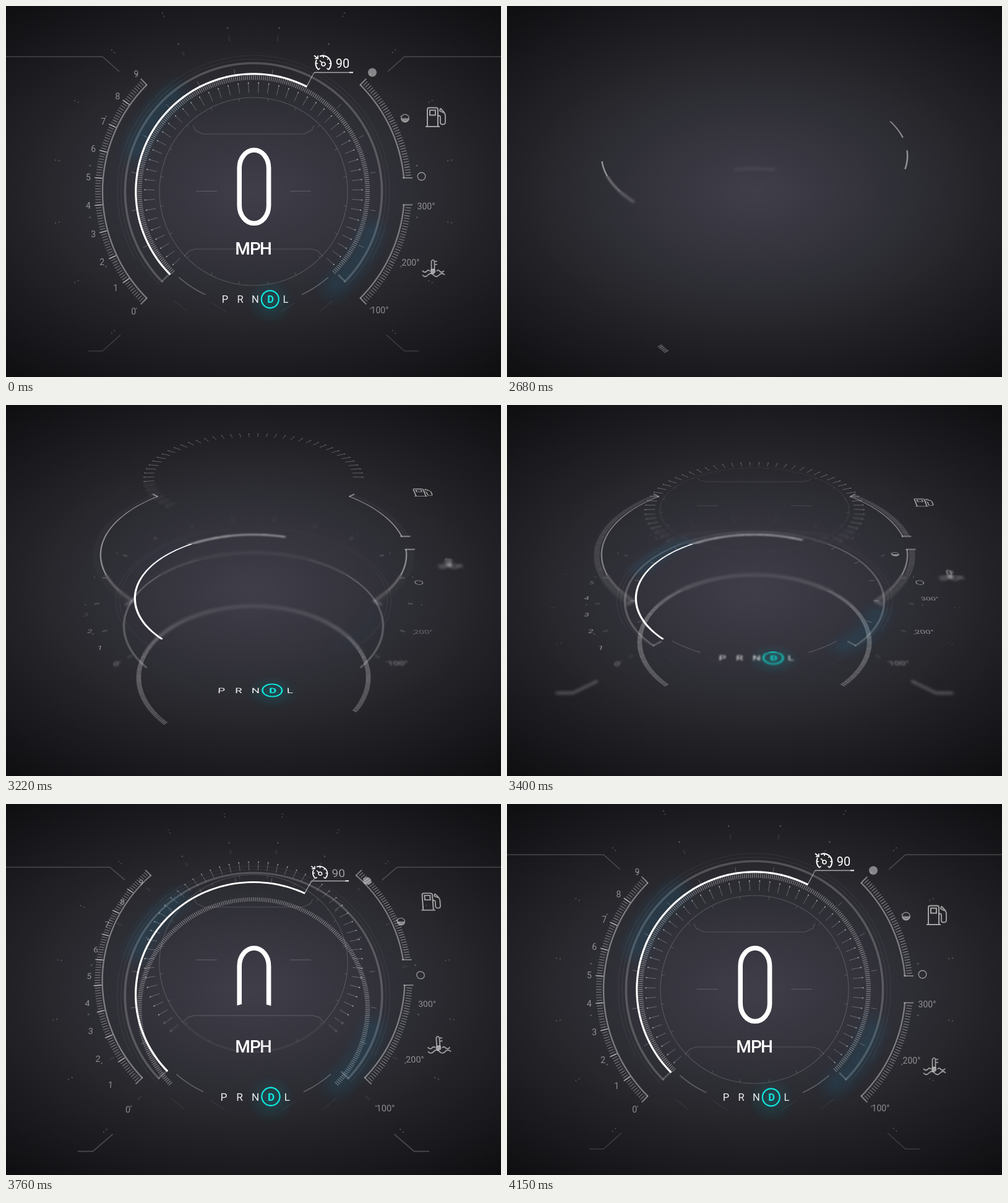
An HTML page with a canvas for the animation above (4.24 s loop, 800x600 px).

```html
<!DOCTYPE html>
<html lang="en">
<head>
<meta charset="utf-8">
<title>Dashboard</title>
<style>
  html, body { margin: 0; width: 100%; height: 100%; overflow: hidden; background: #0e0e11; }
  canvas { display: block; width: 800px; height: 600px; }
</style>
</head>
<body>
<canvas id="stage" width="800" height="600"></canvas>
<script>
const W = 800, H = 600, LOOP = 4240, DEPTH = 1290, RAD = Math.PI / 180, TILT = 57.7 * RAD;
const ctx = document.getElementById('stage').getContext('2d');
const buffer = Object.assign(document.createElement('canvas'), { width: W, height: H });
const g = buffer.getContext('2d');

// Projection state: tilt cosine and sine, perspective slope, layer offset
let t = 0, cos = 1, sin = 0, k = 0, lift = 0;

const white = a => `rgba(255,255,255,${a})`;
const span = (a, b) => Math.min(1, Math.max(0, (t - a) / (b - a)));
const smooth = (a, b) => { const p = span(a, b); return p * p * (3 - 2 * p); };
const polar = (r, a) => [400 + r * Math.cos(a * RAD), 300 + r * Math.sin(a * RAD)];
const mirror = pts => pts.map(([x, y]) => [W - x, y]);

function bezier(x, x1, x2) {
  let lo = 0, hi = 1, u = x;
  for (let i = 0; i < 24; i++) {
    u = (lo + hi) / 2;
    const v = 3 * x1 * u * (1 - u) ** 2 + 3 * x2 * u * u * (1 - u) + u ** 3;
    if (v < x) lo = u; else hi = u;
  }
  return u * u * (3 - 2 * u);
}

function project([x, y]) {
  const s = 1 / (1 - k * (y - 300));
  return [400 + (x - 400) * s, 300 + ((y - 300) * cos + lift) * s];
}

function trace(pts) {
  g.beginPath();
  pts.forEach(p => g.lineTo(...project(p)));
}

function line(pts, width, alpha) {
  trace(pts);
  g.lineWidth = width;
  g.strokeStyle = white(alpha);
  g.stroke();
}

function both(pts, width, alpha) {
  line(pts, width, alpha);
  line(mirror(pts), width, alpha);
}

// Arc with a true projected thickness
function band(r, width, from, to, alpha) {
  if (to - from < .1 || alpha <= 0) return;
  const n = Math.ceil((to - from) / 2), pts = [];
  for (let i = 0; i <= n; i++) pts.push(polar(r + width / 2, from + (to - from) * i / n));
  for (let i = n; i >= 0; i--) pts.push(polar(r - width / 2, from + (to - from) * i / n));
  trace(pts);
  g.fillStyle = white(alpha);
  g.fill();
}

function ticks(r0, r1, from, to, step, width, alpha) {
  g.beginPath();
  for (let a = from; a <= to + .01; a += step) {
    g.moveTo(...project(polar(r0, a)));
    g.lineTo(...project(polar(r1, a)));
  }
  g.lineWidth = width;
  g.strokeStyle = white(alpha);
  g.stroke();
}

// Draws around a local origin lying in the tilted plane
function place(x, y, alpha, draw) {
  if (alpha <= 0) return;
  const X = x - 400, Y = y - 300, s = 1 / (1 - k * Y);
  g.save();
  g.globalAlpha = alpha;
  g.setTransform(s, 0, X * k * s * s, cos * s + (Y * cos + lift) * k * s * s, ...project([x, y]));
  draw();
  g.restore();
}

function dot(x, y, r, alpha) {
  place(x, y, alpha, () => {
    g.fillStyle = '#fff';
    g.beginPath();
    g.arc(0, 0, r, 0, 7);
    g.fill();
  });
}

function glow(x, y, r, rgb, alpha) {
  place(x, y, alpha, () => {
    const fade = g.createRadialGradient(0, 0, 0, 0, 0, r);
    fade.addColorStop(0, `rgba(${rgb},1)`);
    fade.addColorStop(.5, `rgba(${rgb},.4)`);
    fade.addColorStop(1, `rgba(${rgb},0)`);
    g.fillStyle = fade;
    g.fillRect(-r, -r, 2 * r, 2 * r);
  });
}

function print(c, text, x, y, size, color, weight = 400) {
  c.font = `${weight} ${size}px Roboto, Arial, sans-serif`;
  c.textAlign = 'center';
  c.fillStyle = color;
  c.fillText(text, x, y + size * .356);
}

function label(text, x, y, size, alpha, color = '#fff', weight = 400) {
  place(x, y, alpha, () => print(g, text, 0, 0, size, color, weight));
}

function strokes(d, width, color = '#fff') {
  g.lineWidth = width;
  g.strokeStyle = color;
  g.stroke(new Path2D(d));
}

// Renders one plane, then copies it in strips blurred by their distance from focus
function layer(rest, entry, draw) {
  lift = (rest + entry * (1 - smooth(3045, 3450))) * sin / Math.sin(TILT);
  g.clearRect(0, 0, W, H);
  draw();
  if (sin < .05) { ctx.drawImage(buffer, 0, 0); return; }
  const step = 25, focus = sin / Math.sin(TILT);
  for (let y = 0; y < H; y += step) {
    const v = y + step / 2 - 300, Y = (v - lift) / (cos + k * v);
    const z = Math.abs(Y * sin - lift * cos / sin);
    const blur = Math.min(2.6, Math.max(0, (z - 95) / 40)) * focus;
    const top = Math.max(0, y - 10), tall = Math.min(H, y + step + 10) - top;
    ctx.save();
    ctx.beginPath();
    ctx.rect(0, y, W, step);
    ctx.clip();
    if (blur > .25) ctx.filter = `blur(${blur.toFixed(2)}px)`;
    ctx.drawImage(buffer, 0, top, W, tall, 0, top, W, tall);
    ctx.restore();
  }
}

function background() {
  ctx.save();
  ctx.translate(400, 300);
  ctx.scale(1.62, 1);
  const fade = ctx.createRadialGradient(0, 0, 0, 0, 0, 390);
  [[0, '#403e49'], [.256, '#35343d'], [.41, '#2d2d34'], [.59, '#242428'], [.757, '#1b1b1f'], [1, '#0e0e11']]
    .forEach(stop => fade.addColorStop(...stop));
  ctx.fillStyle = fade;
  ctx.fillRect(-400, -300, W, H);
  ctx.restore();
}

function innerDial() {
  const sweep = smooth(2680, 3400), shown = smooth(3150, 3600);
  for (let i = 0; i < 50 * sweep; i++) {
    const a = 137.7 + i * 5.4;
    line([polar(160, a), polar(177, a)], 1, .27);
    dot(...polar(175.5, a), 1.1, .45);
  }
  band(152, 1.2, 0, 360, .16 * shown);
  ticks(147, 152, 9, 360, 18, 1, .18 * shown);
  line([[302, 193], [306, 201], [318, 207], [482, 207], [494, 201], [498, 193]], 1.2, .16 * shown);
  line([[288, 405], [296, 396], [306, 393], [494, 393], [504, 396], [512, 405]], 1.2, .16 * shown);
  both([[307, 299.5], [341, 299.5]], 1.2, .18 * shown);
}

function fineRing() {
  const end = 135 + 270 * smooth(2620, 3300);
  ticks(180.5, 188, 135, end, 1, 1.3, .36);
}

function markers() {
  const near = smooth(2700, 3000), far = smooth(3200, 3500);
  const flash = 1 - span(3600, 3800);
  for (let a = 135; a <= 405; a += 18) {
    dot(...polar(267.5, a), 1.4, near * .22);
    line([polar(246, a), polar(254, a)], 3, near * (.06 + .1 * (1 - span(3100, 3500))));
    dot(...polar(318, a), 1.2, far * .18);
    dot(...polar(324, a), 1.2, far * .18);
  }
  both([[133, 558], [156, 558], [185, 532]], 1.6 + flash, smooth(3250, 3400) * (.15 + .25 * flash));
  both([[-100, 82], [156, 82], [183, 106]], 1.5, smooth(3450, 3750) * .2);
  const low = smooth(3200, 3500);
  band(184, 1.6, 115, 131, .25 * low);
  band(184, 1.6, 49, 65, .25 * low);
  both([[272, 477], [293, 494]], 1.2, .07 * low);
  both([[333, 480], [356, 495]], 1.2, .07 * low);
}

function cruise() {
  const reach = smooth(3450, 3720);
  line([[486, 130], [498, 107.5]], 1.5, .45 * smooth(3400, 3550));
  if (reach > 0) line([[498, 107.5], [498 + 63 * reach, 107.5]], 1.5, .6);
  if (reach > .9) line([[555, 107.5], [561, 107.5]], 1.8, .9);
  place(513, 93, smooth(3500, 3790), () => {
    strokes('M-8 10A13 13 0 0 1 -11 -6M-6 -11.5A13 13 0 0 1 8 10', 2);
    strokes('M-13 0h4M9 0h4M0 -13v4M8.8 -8.8l-2.6 2.6M-8 10l2.5 -2.5M8 10l-2.5 -2.5M-6 -5L-2 -1', 1.6);
    strokes('M3 1A3 3 0 1 1 -3 1A3 3 0 1 1 3 1', 1.7);
    strokes('M-15 -13L-9 -8M-9 -13V-8H-14', 1.7);
  });
  label('90', 544, 93, 20, smooth(3680, 3830));
}

function fuelLevels() {
  const ring = () => strokes('M6.3 0A6.3 6.3 0 1 1 -6.3 0A6.3 6.3 0 1 1 6.3 0', 1.4);
  const half = () => { g.fillStyle = '#fff'; g.beginPath(); g.arc(0, 0, 6.3, 0, Math.PI); g.fill(); };
  dot(592, 107.5, 7, .45 * smooth(3450, 3650));
  place(645, 181.5, .45 * smooth(3250, 3420), () => { ring(); half(); });
  place(671.5, 275.5, .5 * smooth(2980, 3060), ring);
  dot(671.5, 275.5, 6.5, .5 * span(2980, 3060) * (1 - span(3070, 3200)));
}

function mainDial() {
  markers();
  const light = smooth(3150, 3450), faint = smooth(2900, 3300);
  for (const a of [199, 207, 215, 223, 231, 18, 26, 34, 42, 50])
    glow(...polar(202, a), 34, '24,120,160', .17 * light);
  band(214, 1.2, 135, 405, .06 * faint);
  band(220, 1.2, 150, 390, .06 * faint);
  ticks(191, 200, 153, 400, 18, 1, .25 * smooth(3150, 3450));
  band(190.2, 3.2, 135, 135 + 162 * smooth(2750, 3300), 1);
  cruise();
  fuelLevels();
  for (let i = 0; i < 10; i++)
    label(String(i), ...polar(268 + 2 * Math.max(0, 3 - i), 135 + 10 * i), 14, .48 * span(2980 + 65 * i, 3130 + 65 * i));
  label('100°', 604, 492.5, 14, .48 * span(2980, 3130));
  label('200°', 654, 415, 14, .48 * span(3120, 3280));
  label('300°', 679, 324, 14, .48 * span(3260, 3400));
}

function outerRing() {
  const h = 135 * smooth(2550, 3300);
  band(207.5, 3.6, 270 - h, 270 + h, .2);
  if (h > 134) for (const a of [135.5, 404.5]) line([polar(208, a), polar(192, a)], 3, .2);
}

function scales() {
  const grow = smooth(2500, 2950), a = .38 + .1 * (1 - span(3100, 3400));
  const mark = smooth(3100, 3640), major = smooth(3400, 3700);
  const bracket = (from, to) => band(244, 2.4, from, from + (to - from) * grow, a);
  bracket(135, 225);
  bracket(5, 45);
  band(244, 2.4, -5 - 40 * grow, -5, a);
  if (grow > .9) {
    for (const b of [135, 225, 45, -45]) line([polar(243, b), polar(258, b)], 2, a);
    for (const y of [278, 321.5]) line([[641, y], [657, y]], 2, a);
  }
  if (mark > 0) {
    ticks(247, 256, 136, 224, 1, 1.3, .32 * mark);
    ticks(245, 258, 145, 215, 10, 1.6, .5 * major);
    ticks(247, 256, -44, -6, 1, 1.3, .38 * mark);
    ticks(247, 256, 6, 44, 1, 1.3, .34 * mark);
  }
}

function icons() {
  const shown = .58 * smooth(2750, 3040);
  place(695, 179.5, shown, () => {
    strokes('M-14 15V-12Q-14 -15 -11 -15H0Q3 -15 3 -12V15M-17 15.5H6M-10 -11H-1V-3H-10Z', 2);
    strokes('M3 -2H5Q7 -2 7 0V9Q7 12 11 12Q15 12 15 8V-2Q15 -7 7 -14M7 -14L6 -10L12 -7', 1.8);
  });
  place(691, 425, shown, () => {
    strokes('M-3.5 2V-12Q-1 -17 1.5 -12V2M2 -12H6M2 -7H6', 1.7);
    g.fillStyle = '#fff';
    g.beginPath();
    g.arc(-1, 4, 4.2, 0, 7);
    g.fill();
    strokes('M-18 3q4 5 8 0 2 -2 4 1M5 4q2 -3 4 -1 4 5 8 0M-18 10q4.5 5 9 0t9 0 9 0 9 0', 1.8);
  });
}

function gears() {
  const on = i => span([3090, 2930, 2850, 2780, 2800][i], [3220, 3050, 2980, 2900, 2930][i]);
  glow(427, 478, 38, '0,170,180', .24 * on(3));
  [...'PRNDL'].forEach((ch, i) => {
    const x = 354 + 24.5 * i;
    if (ch === 'D') label(ch, x, 474.5, 16.5, on(i), '#0ee6dc', 700);
    else label(ch, x, 474.5, 16.5, on(i) * .92);
  });
  place(426.8, 474.3, on(3), () => strokes('M14 0A14 14 0 1 1 -14 0A14 14 0 1 1 14 0', 2.2, '#0ee6dc'));
}

// Large digit uncovered from the top by a shallow chevron edge
function readout() {
  const p = span(3420, 4150), edge = 225 + 140 * (1 - (1 - p) ** 2);
  if (p > 0) {
    ctx.save();
    ctx.beginPath();
    [[360, 200], [440, 200], [440, edge + 5], [400, edge - 7], [360, edge + 5]].forEach(q => ctx.lineTo(...q));
    ctx.clip();
    ctx.beginPath();
    ctx.roundRect(377.2, 233, 47.4, 118.5, { x: 23.7, y: 29 });
    ctx.lineWidth = 7.6;
    ctx.strokeStyle = '#fff';
    ctx.stroke();
    ctx.restore();
  }
  [...'MPH'].forEach((ch, i) =>
    print(ctx, ch, [382.5, 403, 420][i], 392.5, 28, white(span(3540 + 65 * i, 3640 + 65 * i)), 500));
}

function render() {
  const e = bezier(span(3400, 4150), .4, .28), tilt = TILT * (1 - e);
  cos = Math.cos(tilt);
  sin = Math.sin(tilt);
  k = sin / DEPTH;
  background();
  if (t < 2500) return;
  layer(-133, -93, innerDial);
  layer(66, 101, fineRing);
  layer(0, 69, outerRing);
  layer(0, 0, mainDial);
  layer(-77, 0, scales);
  layer(-88, -31, icons);
  layer(0, 83, gears);
  readout();
}

const start = performance.now();
let last = -1;

function frame() {
  const now = (performance.now() - start) % LOOP;
  // Complete dial first, then an empty stage, then assembly in 30 ms steps
  t = now < 2000 ? 4240 : now < 2500 ? 2000 : Math.min(4150, 2500 + Math.floor((now - 2500) / 30) * 30);
  if (t !== last) render();
  last = t;
  requestAnimationFrame(frame);
}
frame();
</script>
</body>
</html>
```
